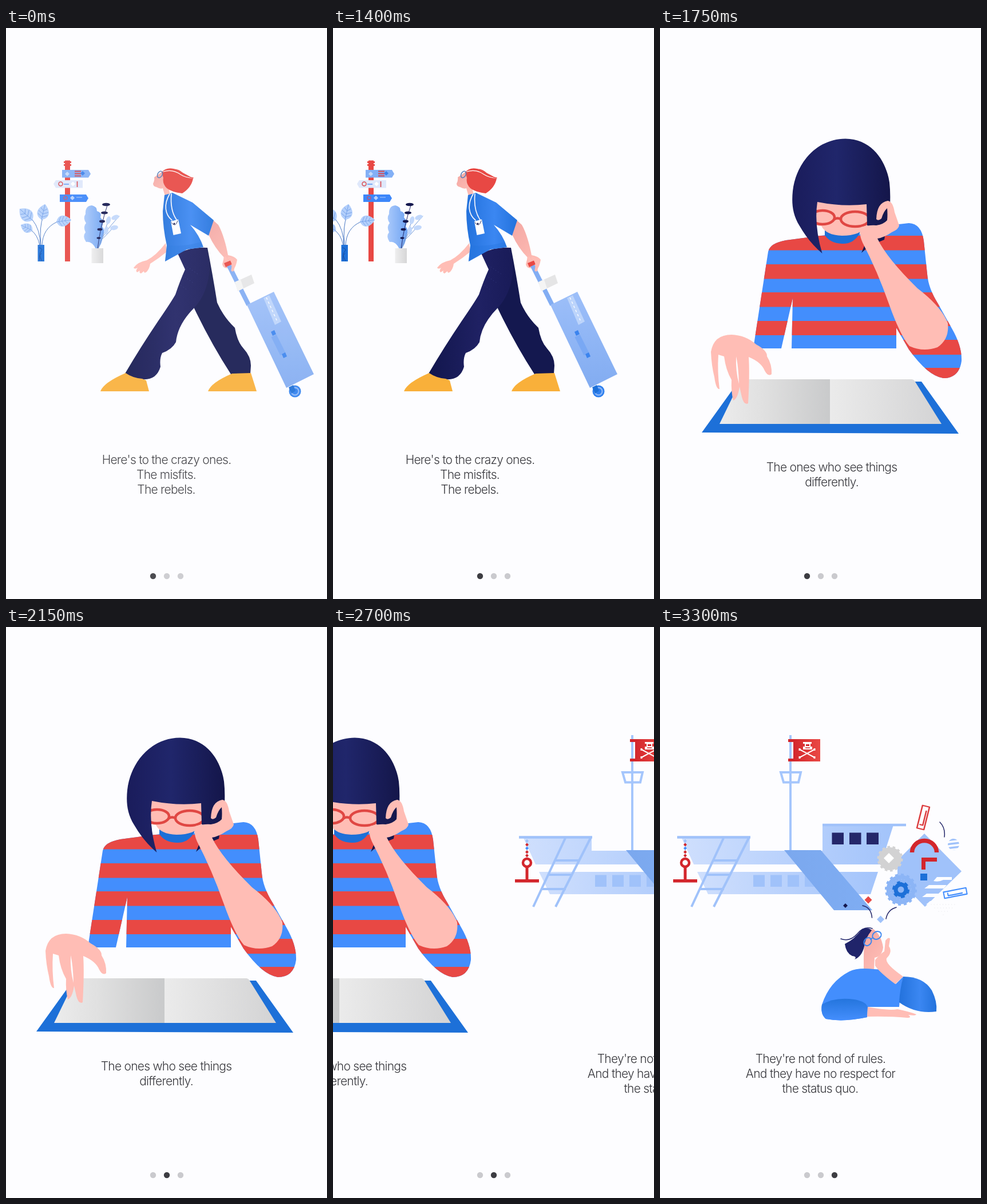
Animation, 561 px wide and 998 px high, one loop 3.35 s. Source, as an HTML page:

```html
<!DOCTYPE html>
<html lang="en">
<head>
<meta charset="utf-8">
<title>Onboarding</title>
<style>
  html, body { margin: 0; width: 100%; height: 100%; overflow: hidden; background: #fdfdff; }
  svg { display: block; width: 100vw; height: 100vh; }
  text { font: 300 21px Inter, "Open Sans", sans-serif; letter-spacing: -.75px; fill: #38383d; text-anchor: middle; }
  .line { fill: none; stroke-linecap: round; stroke-linejoin: round; }
  .skin { fill: #ffbdb5; }
  .red { fill: #e84844; }
  .blue { fill: #1d70d8; }
  .navy { fill: #14184f; }
</style>
</head>
<body>
<svg viewBox="0 0 561 998" preserveAspectRatio="none">
  <defs>
    <linearGradient id="shirt"><stop stop-color="#2372dc"/><stop offset=".55" stop-color="#3b87f2"/><stop offset="1" stop-color="#2372dc"/></linearGradient>
    <linearGradient id="leg"><stop stop-color="#12164d"/><stop offset=".6" stop-color="#1f2163"/><stop offset="1" stop-color="#191b58"/></linearGradient>
    <linearGradient id="case" x2="0" y2="1"><stop stop-color="#9dbff9"/><stop offset="1" stop-color="#82acf1"/></linearGradient>
    <linearGradient id="arm" x2=".7" y2="1"><stop stop-color="#f3a7a3"/><stop offset="1" stop-color="#ffbdb5"/></linearGradient>
    <linearGradient id="frond"><stop stop-color="#a9c9fb"/><stop offset="1" stop-color="#6da2f2"/></linearGradient>
    <linearGradient id="pot"><stop stop-color="#eeeeef"/><stop offset="1" stop-color="#d6d6d7"/></linearGradient>
    <linearGradient id="bob"><stop stop-color="#1a1c5b"/><stop offset=".45" stop-color="#20266b"/><stop offset="1" stop-color="#14164a"/></linearGradient>
    <linearGradient id="pageL"><stop stop-color="#ececec"/><stop offset=".4" stop-color="#e0e0e0"/><stop offset="1" stop-color="#c9cacb"/></linearGradient>
    <linearGradient id="pageR"><stop stop-color="#ebebeb"/><stop offset="1" stop-color="#d3d3d4"/></linearGradient>
    <linearGradient id="hull"><stop stop-color="#cfdffd"/><stop offset="1" stop-color="#a3c4fb"/></linearGradient>
    <linearGradient id="plank"><stop stop-color="#7ba8ee"/><stop offset="1" stop-color="#7fadf3"/></linearGradient>
    <linearGradient id="flag"><stop stop-color="#d3262c"/><stop offset="1" stop-color="#ea4945"/></linearGradient>
    <linearGradient id="cuff" x2="0" y2="1"><stop stop-color="#2475dd"/><stop offset="1" stop-color="#448efd"/></linearGradient>
    <clipPath id="sweater">
      <path d="M268 362Q230 367 200 371Q172 376 169 391L143 560H192L212 472L210 560H393V524L415 562Q448 608 475 612Q503 612 507 582Q508 556 490 525L466 482Q449 455 447 430L441 372Q437 342 415 341L380 345L340 360Z"/>
    </clipPath>
    <clipPath id="face"><path d="M253 300H342V346Q330 363 298 363Q270 362 262 346L253 345Z"/></clipPath>
    <clipPath id="ball"><circle cx="513" cy="380" r="10"/></clipPath>
    <g id="leaf">
      <path d="M0 0C-16-6-13-20 0-30C13-20 16-6 0 0Z" fill="#b3cffb"/>
      <path class="line" d="M0 0V-28M0-5L-9-10M0-5L9-10M0-11L-9-16M0-11L9-16M0-17L-6-22M0-17L6-22" stroke="#6b9ae6" stroke-width=".8"/>
    </g>
    <g id="clip" class="line" stroke-linejoin="miter">
      <path d="M-5 10V20H5V-20H-5V13M-2 13H2V-12"/>
    </g>
  </defs>

  <g id="stage">
    <g class="page">
      <!-- signpost -->
      <path class="red" d="M103 231.500H112V408H103ZM101 233H114V236H101ZM101 238H114V241H101Z"/>
      <path d="M98 248H144L148 255L144 261.500H98Z" fill="#83b0f6"/>
      <path d="M107 251L111 255L107 259L103 255Z" fill="#c4d9fb"/>
      <path d="M120 250.500H131M120 254.500H131M120 258.500H131" stroke="#d6494f" stroke-width="2"/>
      <path d="M134 250L138 254L134 258L130 254Z" fill="#3c82eb"/>
      <path d="M134 266H87L83 272.500L87 279.500H134Z" fill="#dfe8fb"/>
      <circle cx="95.500" cy="272.500" r="3.500" fill="none" stroke="#d94a50" stroke-width="1.500"/>
      <path d="M101 273H110" stroke="#78a8f4" stroke-width="2"/>
      <path d="M117 268.500L121 272.500L117 276.500L113 272.500Z" fill="#fff"/>
      <path d="M124.500 268V278" stroke="#d94a50" stroke-width="1.700"/>
      <path d="M94 291H140L144 297.500L140 304H94Z" fill="#3d87fa"/>
      <circle cx="104" cy="297" r="3" fill="none" stroke="#b35a83" stroke-width="1.500"/>
      <path d="M116 293L120 297L116 301L112 297Z" fill="#b9d2fb"/>
      <path d="M123 296H133" stroke="#8ab5fb" stroke-width="1.500"/>

      <!-- plants -->
      <path class="line" d="M60 380Q60 352 46 335M61 380Q58 345 65 330M59 380Q55 360 43 353M63 380Q64 350 89 339" stroke="#4a79c4" stroke-width="1"/>
      <use href="#leaf" transform="translate(46 336) rotate(-48)"/>
      <use href="#leaf" transform="translate(62 335) rotate(13) scale(.93)"/>
      <use href="#leaf" transform="translate(46 354) rotate(-64) scale(.75)"/>
      <use href="#leaf" transform="translate(88 339) rotate(82) scale(.88)"/>
      <path class="blue" d="M55.500 379H67V408H55.500Z"/>
      <path class="line" d="M58 384Q66 386 61 391T63 407M59 406Q57 396 62 394" stroke="#164b9f" stroke-width="1"/>
      <path d="M157 386Q150 372 140 374Q133 364 139 357Q134 347 140 341Q134 332 139 325Q138 311 150 310Q159 312 159 320Q168 322 165 331Q172 338 168 347Q174 353 169 364Q168 378 160 386Z" fill="url(#frond)"/>
      <path class="line" d="M161 386Q165 363 198 329M162 384Q170 360 180 334M165 372Q176 362 187 349" stroke="#7198d6" stroke-width="1"/>
      <g fill="#c2d8fb">
        <ellipse cx="179" cy="336" rx="4" ry="7" transform="rotate(15 179 336)"/>
        <ellipse cx="191" cy="331" rx="4" ry="7" transform="rotate(70 191 331)"/>
        <ellipse cx="189" cy="349" rx="4" ry="7" transform="rotate(80 189 349)"/>
        <ellipse cx="175" cy="354" rx="4" ry="7" transform="rotate(10 175 354)"/>
      </g>
      <path class="line" d="M160 386Q165 345 178 307" stroke="#232868" stroke-width="1"/>
      <g class="navy">
        <ellipse cx="175" cy="308.500" rx="7" ry="2.800"/><ellipse cx="172" cy="323" rx="6" ry="2.600"/>
        <ellipse cx="168" cy="338" rx="5" ry="2.400"/><ellipse cx="164" cy="352" rx="4.500" ry="2.200"/>
        <ellipse cx="162" cy="367" rx="3.500" ry="1.800"/>
      </g>
      <path d="M149.500 385H170V411H149.500Z" fill="url(#pot)"/>

      <!-- traveller -->
      <path d="M279 376Q262 398 246 406Q230 409 223 419Q225 422 230 419Q226 424 229 427L234 424Q232 428 236 429L241 425Q241 430 246 426Q251 420 252 412Q268 402 281 391Z" class="skin"/>
      <path d="M272 252L259 261Q260 266 257 272Q257 277 263 278Q270 282 274 280L278 294L287 292L283 274Z" fill="url(#arm)"/>
      <path d="M362 336L371 344C379 358 385 380 388 397Q400 399 404 405Q402 418 396 424L390 419Q380 422 378 413L381 401Q365 385 354 361Z" fill="url(#arm)"/>
      <path d="M338 384H352Q361 430 369 480Q380 505 400 524Q404 548 415 560Q428 574 428 590L427 604L393 605Q358 551 328 488Z" class="navy"/>
      <path d="M300 394Q325 382 350 384Q357 402 355 430Q350 467 329 489Q300 518 297 549Q290 562 273 568Q268 578 270 592Q263 616 238 614Q222 612 208 604Q235 558 266 512Q288 480 296 466Q304 442 313 422Z" fill="url(#leg)"/>
      <path class="line" d="M313 415L335 430M309 433L328 446M306 450L318 459" stroke="#39408a" stroke-width="1" stroke-dasharray=".1 5"/>
      <path d="M277 292L291 288L326 305L363 336L354 363L322 344Q338 362 345 383L316 387L278 408L281 380Q274 350 274 320Z" fill="url(#shirt)"/>
      <path d="M281 380L278 408L316 387L345 383L341 374Q310 383 281 380Z" fill="#2372dc" opacity=".35"/>
      <path class="red" d="M272 252Q280 243 293 246Q309 252 327 263Q324 279 308 289Q290 287 281 280Q273 272 275 262Z"/>
      <path class="line" d="M275 251Q291 246 305 256Q314 262 327 262" stroke="#fff" stroke-width="1.300"/>
      <path class="line" d="M289 247Q301 246 309 254Q317 261 327 262" stroke="#e84844" stroke-width="1.500"/>
      <ellipse cx="269" cy="256" rx="4" ry="6" transform="rotate(28 269 256)" fill="none" stroke="#527bb8" stroke-width="1.500"/>
      <path class="line" d="M286 290C275 309 278 326 290 336M289 290C287 312 291 325 298 335" stroke="#f7f7fd" stroke-width="1.700"/>
      <path d="M288 338L301 334.500L306 359L292.500 362Z" fill="#fdfdff"/>
      <path class="line" d="M289 340Q296 350 300 337" stroke="#333a66" stroke-width="1"/>
      <circle cx="294" cy="342" r="1.500" class="navy"/>
      <path id="shoe" d="M165 635Q170 620 209 603Q222 612 238 613L245 616L250 635Z" fill="#f9b03a"/>
      <path d="M353 635Q358 620 395 604L428 603L438 635Z" fill="#f9b03a"/>

      <!-- suitcase -->
      <path d="M388 412L424 484" stroke="#82adf3" stroke-width="8"/>
      <path class="red" d="M381 411L392 406.500L395 413L384 418Z"/>
      <path class="line" d="M390 402Q400 406 396 423M385 405L383 402" stroke="#ffbdb5" stroke-width="5"/>
      <path d="M400 444L429 431L434 446L405 460Z" fill="#e5e5e6"/>
      <path d="M400 444L410 439.500L415 455L405 460Z" fill="#f4f4f4"/>
      <path d="M421 484L468 461L538 605L490 629Z" fill="url(#case)"/>
      <path d="M450 472L460 467L481 513L470 519Z" fill="#bcd4fb"/>
      <path d="M455 471L475 515" stroke="#fff" stroke-width="1.300" stroke-dasharray="4 4"/>
      <path d="M468 538L484 570" stroke="#79a8f4" stroke-width="10"/>
      <path d="M463 531L469 528L472 535L466 538ZM482 570L488 567L491 574L485 577Z" fill="#3b84ee"/>
      <circle cx="505" cy="635" r="10.500" fill="#2f80ee"/>
      <circle cx="505" cy="635" r="6.500" fill="none" stroke="#86b3f7" stroke-width="2.500"/>
      <path class="blue" d="M494 628L502 624L506 634L499 639Z"/>

      <text x="280.500" y="762">Here's to the crazy ones.</text>
      <text x="280" y="788">The misfits.</text>
      <text x="280" y="814">The rebels.</text>
    </g>

    <g class="page">
      <!-- sweater -->
      <g clip-path="url(#sweater)" id="stripes"><path d="M140 335H520V620H140Z" fill="#438efd"/></g>
      <path d="M332 393Q345 380 372 370L382 308L341 307L345 362Z" class="navy"/>
      <path d="M268 350H331L329 359Q318 378 298 377Q277 376 268 362Z" class="blue"/>
      <!-- head -->
      <g clip-path="url(#face)">
        <path d="M250 295H345V370H250Z" class="skin"/>
        <g class="line" stroke="#e04743" stroke-width="4.500">
          <ellipse cx="264" cy="331" rx="21" ry="12"/><ellipse cx="321" cy="334" rx="25" ry="13"/>
          <path d="M285 334Q290 331 296 334"/>
        </g>
      </g>
      <path d="M263.500 394Q240 374 224 346C211 325 210 305 212 285C217 238 252 194 304 193.500C352 194 376 235 381 270Q383 288 382 308L375 350Q350 351 342 345L341 308Q300 313 255 304Q249 345 263.500 394Z" fill="url(#bob)"/>
      <path class="skin" d="M334 375Q327 360 331 348Q346 344 358 345Q371 343 377 336Q378 326 377 315Q371 320 367 333Q361 338 358 334Q359 305 378 302Q387 303 390 322L398 345Q397 352 385 357Q372 366 360 368Q376 402 430 455Q472 487 483 516Q486 544 465 558Q440 567 416 556Q400 538 380 482Q360 425 334 375Z"/>

      <!-- book -->
      <path class="blue" d="M53 707L117 618H437L502 709Z"/>
      <path d="M84 692L122 614H277V692Z" fill="url(#pageL)"/>
      <path d="M277 614H420Q424 614 427 620L472 692H277Z" fill="url(#pageR)"/>
      <path class="skin" d="M69 566Q74 536 105 536Q130 537 148 553Q168 564 167 574Q176 588 175 605Q169 610 163 599Q157 584 135 575Q137 605 134 656Q127 660 123 645L119 627Q116 648 108 651Q104 635 105 615Q95 598 92 574L82 571Q80 600 84 631Q78 632 75 610Q70 590 69 566Z"/>
      <path d="M113 574Q117 590 118 622Q112 600 113 574Z" fill="#fdfdff"/>

      <text x="280" y="775">The ones who see things</text>
      <text x="280" y="801">differently.</text>
    </g>

    <g class="page">
      <!-- ship -->
      <path d="M226 189H230V392H226Z" fill="#a5c6fc"/>
      <path d="M211 254H246L242 271.500H216Z" fill="none" stroke="#a5c6fc" stroke-width="4"/>
      <path d="M233 196H280V235H233Z" fill="url(#flag)"/>
      <path d="M224 196H235V201H224ZM224 230H235V235H224Z" fill="#d3262c"/>
      <path d="M250 201H265V204H263V209H266V214H250V209H253V204H250Z" fill="#fff"/>
      <path d="M255 205H261V208H255ZM254 210.500H262V212H254Z" fill="#d3262c"/>
      <path class="line" d="M244 214L270 228M270 214L244 228" stroke="#fff" stroke-width="2"/>
      <path d="M244 212V216M270 212V216M244 226V230M270 226V230" stroke="#fff" stroke-width="3"/>
      <path d="M38 369H157V391H284V346H408L386 415H59Z" fill="url(#hull)"/>
      <path d="M65 428H381L368 467H84Z" fill="url(#hull)"/>
      <path d="M30 367.500H158M284 346H430" stroke="#a0c2fa" stroke-width="4.500"/>
      <path d="M163 433.500H183V454H163ZM193 433.500H213V454H193ZM223 433.500H243V454H223ZM253 433.500H273V454H253Z" fill="#a0c2fa"/>
      <path d="M300.500 359.500H321V380H300.500ZM331 359.500H351.500V380H331ZM361 359.500H382V380H361Z" fill="#24276a"/>
      <path d="M217 390H281L371 495H304Z" fill="url(#plank)"/>
      <path d="M111 369L55 489M155 369L94 489M94 408H136M82 433H124M70 458H112" fill="none" stroke="#a0c2fa" stroke-width="4"/>
      <path d="M44 371V403" stroke="#a0c2fa"/>
      <g id="chain"></g>
      <circle cx="44" cy="412" r="7" fill="none" stroke="#d3262c" stroke-width="4.500"/>
      <path d="M41.500 419H46.500V441H65V446.500H23V441H41.500Z" fill="#d3262c"/>

      <!-- thoughts -->
      <path d="M462 361L527 427L463 489L415 440V408Z" fill="#a0c2fa"/>
      <path d="M484 437H510V442H495Q488 446 478 444ZM470 451H501L496 457H462ZM466 466H488L482 472H458ZM472 479H481L474 485H465Z" fill="#fdfdff"/>
      <path class="line" d="M474 485H518M480 491H512M487 497H506M495 503H500" stroke="#dedee5" stroke-width="1" stroke-dasharray=".1 5"/>
      <path d="M440.500 394A21.500 20.500 0 0 1 483.500 394" fill="none" stroke="#d3262c" stroke-width="7.500"/>
      <path d="M457 403H484V410H464V424H457Z" fill="#d3262c"/>
      <path class="blue" d="M455 431H467V443H455Z"/>
      <g fill="#d2d2d3" stroke="#d2d2d3">
        <circle cx="402" cy="405" r="20" stroke-width="5" pathLength="28" stroke-dasharray="1 1"/>
      </g>
      <path d="M400 395L409 404L400 413L391 404Z" fill="#fff"/>
      <circle cx="421" cy="459" r="25.500" fill="#8cb5f6" stroke="#8cb5f6" stroke-width="5" pathLength="32" stroke-dasharray="1 1"/>
      <circle cx="421" cy="459" r="18" fill="none" stroke="#b6d0fa" stroke-width="1" stroke-dasharray="1 4"/>
      <circle cx="421" cy="459" r="9" fill="none" stroke="#1d70d8" stroke-width="7"/>
      <circle cx="421" cy="459" r="13" fill="none" stroke="#1d70d8" stroke-width="4" pathLength="12" stroke-dasharray="1 1"/>
      <use href="#clip" transform="translate(460 333) rotate(14) scale(1.250 1.020)" stroke="#dc3b3d" stroke-width="2"/>
      <use href="#clip" transform="translate(516 465) rotate(79) scale(1.100 1)" stroke="#438efd" stroke-width="2"/>
      <g clip-path="url(#ball)" stroke="#a0c2fa" stroke-width="3.500">
        <path d="M500 373L526 370M500 380L526 377M500 387L526 384M500 393L526 390"/>
      </g>
      <g class="line" stroke="#24276a" stroke-width="1.500">
        <path d="M489 341Q499 351 497 367M354 487Q369 490 370.500 508M413 490Q398 494 395 510"/>
      </g>
      <path d="M364 470.500L370.500 477L364 483.500L357.500 477Z" class="red"/>
      <path d="M324 483L328 487L324 491L320 487Z" class="navy"/>
      <path d="M385.500 504.500L392 511L385.500 517.500L379 511Z" fill="#a0c2fa"/>

      <!-- dreamer -->
      <path d="M357 545Q360 530 373 528Q387 539 390 560Q388 576 375 578L374 600H356V575Z" fill="url(#arm)"/>
      <path d="M323 554Q340 546 353 528Q364 524 370 530Q358 545 357 558Q353 576 340 581Q345 576 336 575Q325 570 323 554Z" fill="#20246a"/>
      <path class="line" d="M316 545Q332 551 345 536Q356 522 371 527" stroke="#20246a" stroke-width="1.500"/>
      <g class="line" stroke="#3d87ef" stroke-width="2">
        <ellipse cx="363" cy="550" rx="6" ry="7.500" transform="rotate(35 363 550)"/>
        <ellipse cx="379" cy="539" rx="8" ry="6.500" transform="rotate(-30 379 539)"/>
        <path d="M368 546L372 543"/>
      </g>
      <path d="M331 602Q345 595 374 598L393 599L412 624L425 611Q420 640 418 664H363L362 682Q320 691 290 685Q280 677 283 660Q296 620 331 602Z" fill="#438efd"/>
      <path d="M283 660Q305 646 340 651Q361 655 363 665L362 682Q320 691 290 685Q280 677 283 660Z" fill="url(#cuff)"/>
      <path d="M425 611Q460 611 475 635Q485 655 483 672Q447 677 418 656Q419 635 425 611Z" fill="url(#shirt)"/>
      <path class="skin" d="M376 582Q385 571 392 567L394 548Q400 541 402 545L400 558Q407 568 396 579Q392 588 425 611L411 624Q384 604 376 592ZM363 664Q400 671 415 668Q435 672 448 677Q447 680 434 678Q441 683 432 683Q400 680 362 681Z"/>

      <text x="280.500" y="762">They're not fond of rules.</text>
      <text x="280.500" y="788">And they have no respect for</text>
      <text x="280" y="814">the status quo.</text>
    </g>

    <g id="dots"></g>
  </g>
</svg>
<script>
  const WIDTH = 561, LOOP = 3350, STEP = 50;
  const SWIPES = [1400, 2600], SETTLE = 500;
  const GLIDE = [41, 148, 266, 365, 441, 492, 523, 541, 552, 558, 561];
  const FADE = [.92, .95, .98];

  const $ = id => document.getElementById(id);
  function add(parent, tag, attrs) {
    const el = document.createElementNS("http://www.w3.org/2000/svg", tag);
    for (const key in attrs) el.setAttribute(key, attrs[key]);
    return parent.appendChild(el);
  }

  // Sweater bands, then the lower sleeve
  const band = (y, h, x = 140, w = 380) =>
    add($("stripes"), "rect", { x, y, width: w, height: h, fill: "#e84844" });
  for (const y of [363, 413, 462]) band(y, 25.5);
  band(512, 25, 140, 265);
  band(512, 9, 465, 60);
  band(545, 26, 405, 110);
  band(594, 20, 405, 110);

  ["#a0c2fa", "#d3262c", "#438efd", "#d3262c", "#d3262c"].forEach((fill, i) => {
    const y = 374 + i * 6.4;
    add($("chain"), "path", { d: `M44 ${y - 3}l3 3-3 3-3-3Z`, fill });
  });

  const dots = [257, 281, 305].map(cx => add($("dots"), "circle", { cx, cy: 958, r: 5.2 }));
  const pages = document.querySelectorAll(".page");

  function draw(now) {
    const time = Math.floor((now % LOOP) / STEP) * STEP;
    let scroll = 0, active = 0;
    for (const start of SWIPES) {
      if (time < start) continue;
      scroll += GLIDE[Math.min((time - start) / STEP, GLIDE.length - 1)];
      if (time >= start + SETTLE) active++;
    }
    pages.forEach((page, i) => page.setAttribute("transform", `translate(${i * WIDTH - scroll} 0)`));
    dots.forEach((dot, i) => dot.setAttribute("fill", i === active ? "#3d3d42" : "#cacace"));
    $("stage").setAttribute("opacity", FADE[time / STEP] ?? 1);
  }

  const begin = performance.now();
  function tick() {
    draw(performance.now() - begin);
    requestAnimationFrame(tick);
  }
  tick();
</script>
</body>
</html>
```
